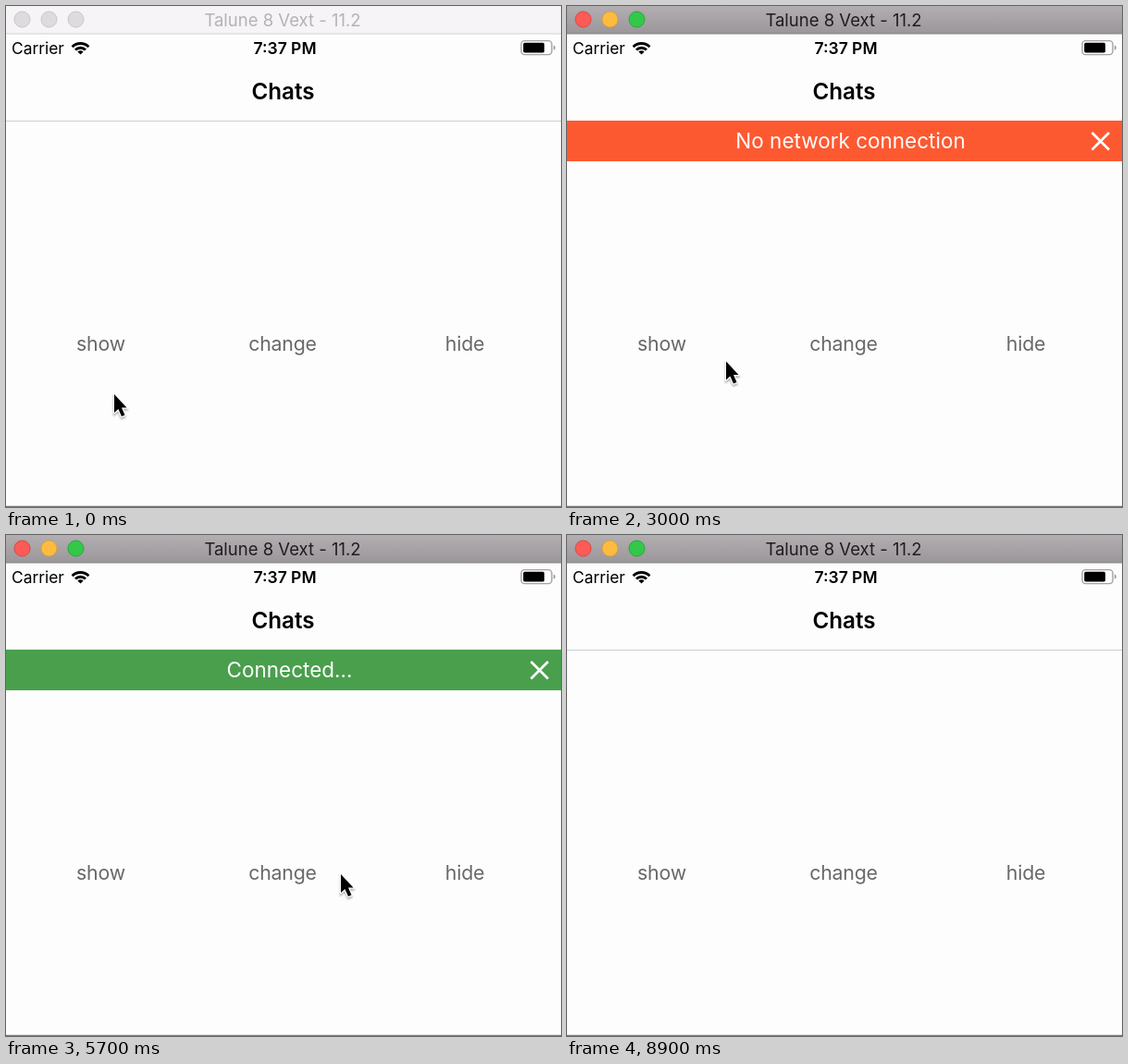
Recreate the animation shown at these times as an HTML page. Size 600 by 542 pixels, loop 9000 ms.

```html
<!DOCTYPE html>
<html lang="en">
<head>
<meta charset="utf-8">
<title>Banner demo</title>
<style>
  html, body { margin: 0; width: 100%; height: 100%; overflow: hidden; background: #fefdfe; }
  svg { display: block; width: 100vw; height: 100vh; }
  text { font-family: Inter, Roboto, "Liberation Sans", sans-serif; text-anchor: middle; }
  .btn { font-size: 21.3px; letter-spacing: -.01em; fill: #69676a; }
  .msg { font-size: 22.5px; fill: #fff; }
</style>
</head>
<body>
<svg viewBox="0 0 600 542" preserveAspectRatio="none">
  <defs>
    <linearGradient id="bar" x2="0" y2="1">
      <stop stop-color="#b2aeb1"/>
      <stop offset="1" stop-color="#9a969a"/>
    </linearGradient>
    <clipPath id="clip"><rect id="clipRect" y="124" width="600" height="44"/></clipPath>
    <filter id="soft" x="-50%" y="-50%" width="200%" height="200%"><feGaussianBlur stdDeviation="1.3"/></filter>
    <path id="arrow" d="M0 0V20L4.4 16L8 24L11.5 22.5L8 14.5H13.5Z"/>
  </defs>

  <rect width="600" height="542" fill="#fefdfe"/>
  <rect id="titleBar" width="600" height="30"/>
  <rect id="titleEdge" y="29.5" width="600" height="1"/>
  <g id="lights">
    <circle cx="17.5" cy="14.5" r="8.5"/>
    <circle cx="46.5" cy="14.5" r="8.5"/>
    <circle cx="75.5" cy="14.5" r="8.5"/>
  </g>
  <text id="title" x="299" y="21.5" font-size="18.5">Talune 8 Vext - 11.2</text>

  <text x="6" y="52" font-size="17.4" style="text-anchor:start">Carrier</text>
  <g fill="none" stroke="#000" stroke-width="2.8">
    <path d="M71.6 44.2A12.6 12.6 0 0 1 89.4 44.2"/>
    <path d="M75 47.5A7.8 7.8 0 0 1 86 47.5"/>
  </g>
  <path d="M80.5 52.6L77.4 49.5A4.4 4.4 0 0 1 83.6 49.5Z"/>
  <text x="301.5" y="52" font-size="17.5" font-weight="600">7:37 PM</text>
  <rect x="557" y="37.6" width="33" height="15" rx="3.6" fill="none" stroke="#a3a1a3" stroke-width="1.4"/>
  <rect x="559.2" y="39.8" width="22.8" height="10.6" rx="1.6"/>
  <path d="M591.8 42.4Q594 43 594 45.1T591.8 47.8Z" fill="#a3a1a3"/>
  <text x="299.5" y="101" font-size="24.2" font-weight="600">Chats</text>
  <rect y="124" width="600" height="1" fill="#cfcdd1"/>

  <g id="banner" clip-path="url(#clip)">
    <rect id="fill" y="124" width="600" height="44"/>
    <text id="msg" class="msg" x="306.5" y="154.3"></text>
    <path id="close" d="M567.5 137L586 155.5M586 137L567.5 155.5" stroke="#fff" stroke-width="2.7"/>
  </g>

  <text id="show" class="btn" x="102.5" y="373">show</text>
  <text id="change" class="btn" x="299" y="373">change</text>
  <text id="hide" class="btn" x="496" y="373">hide</text>
  <rect y="540.8" width="600" height="1.2" fill="#7b797b"/>

  <g id="cursor">
    <use href="#arrow" y="2" fill="#000" stroke="#000" stroke-width="2" opacity=".35" filter="url(#soft)"/>
    <use href="#arrow" fill="#000" stroke="#fff" stroke-width="2.6" stroke-linejoin="round" paint-order="stroke"/>
  </g>
</svg>
<script>
const LOOP = 9000, STEP = 100;
const ACTIVE = 1400, SHOW = 1462, CHANGE = 4670, HIDE = 6940, SLIDE = 300;
const GONE = 8300;

// time, x, y of the pointer tip
const PATH = [
  [0, 117, 420], [100, 121, 413], [200, 124, 400], [300, 113, 380], [400, 103, 366],
  [500, 99, 361], [2000, 99, 361], [2300, 112, 370], [2700, 148, 382], [3000, 172, 384.5],
  [3400, 220, 382], [3800, 270, 370], [4200, 299, 364], [5300, 299, 364],
  [5700, 362, 367], [6100, 460, 369], [6400, 489, 370], [7700, 489, 370],
  [8000, 520, 358], [8200, 557, 340]
];
// id, pressed at, released at
const PRESSES = [['show', ACTIVE, SHOW], ['change', 4500, CHANGE], ['hide', 6880, HIDE]];
const LIGHTS = [['#fc5b57', '#df4540'], ['#fdbc40', '#dfa12f'], ['#34c84a', '#27aa35']];

const $ = id => document.getElementById(id);
const set = (el, attrs) => { for (const k in attrs) el.setAttribute(k, attrs[k]); };
const clamp = v => Math.min(1, Math.max(0, v));
const ease = u => u < .5 ? 2 * u * u : 1 - 2 * (1 - u) ** 2;
const slide = (t, from) => ease(clamp((t - from) / SLIDE));

function pointer(t) {
  const i = PATH.findIndex(p => p[0] > t);
  if (i < 0) return PATH[PATH.length - 1].slice(1);
  const [a, b] = [PATH[i - 1], PATH[i]];
  const u = (t - a[0]) / (b[0] - a[0]);
  return [a[1] + (b[1] - a[1]) * u, a[2] + (b[2] - a[2]) * u];
}

function drawWindow(t) {
  const on = t >= ACTIVE;
  set($('titleBar'), { fill: on ? 'url(#bar)' : '#f6f4f6' });
  set($('titleEdge'), { fill: on ? '#858285' : '#d3d1d3' });
  set($('title'), { fill: on ? '#1f1d1f' : '#b4b2b4' });
  [...$('lights').children].forEach((dot, i) => {
    const [fill, stroke] = on ? LIGHTS[i] : ['#dddbdd', '#c8c6c8'];
    set(dot, { fill, stroke });
  });
}

function drawBanner(t) {
  const shown = slide(t, SHOW), open = shown - slide(t, HIDE);
  const height = 44 * open;
  const connected = t >= CHANGE;
  set($('banner'), { opacity: shown });
  set($('clipRect'), { height });
  set($('fill'), { fill: connected ? '#4a9f4d' : '#fd5931' });
  // the label never rises above the top edge of the banner
  set($('msg'), { transform: `translate(0 ${Math.max(height / 2, 13) - 22})` });
  $('msg').textContent = connected ? 'Connected...' : 'No network connection';
  set($('close'), { opacity: clamp((open - .45) * 2) });
}

function drawButtons(t) {
  for (const [id, down, up] of PRESSES) {
    const opacity = t < down ? 1 : .25 + .75 * clamp((t - up) / 350);
    set($(id), { opacity });
  }
}

function drawCursor(t) {
  const [x, y] = pointer(t);
  set($('cursor'), { transform: `translate(${x} ${y})`, visibility: t < GONE ? 'visible' : 'hidden' });
}

const start = performance.now();
function frame(now) {
  const t = Math.floor((Math.max(0, now - start) % LOOP) / STEP) * STEP;
  drawWindow(t);
  drawBanner(t);
  drawButtons(t);
  drawCursor(t);
  requestAnimationFrame(frame);
}
frame(start);
</script>
</body>
</html>
```
